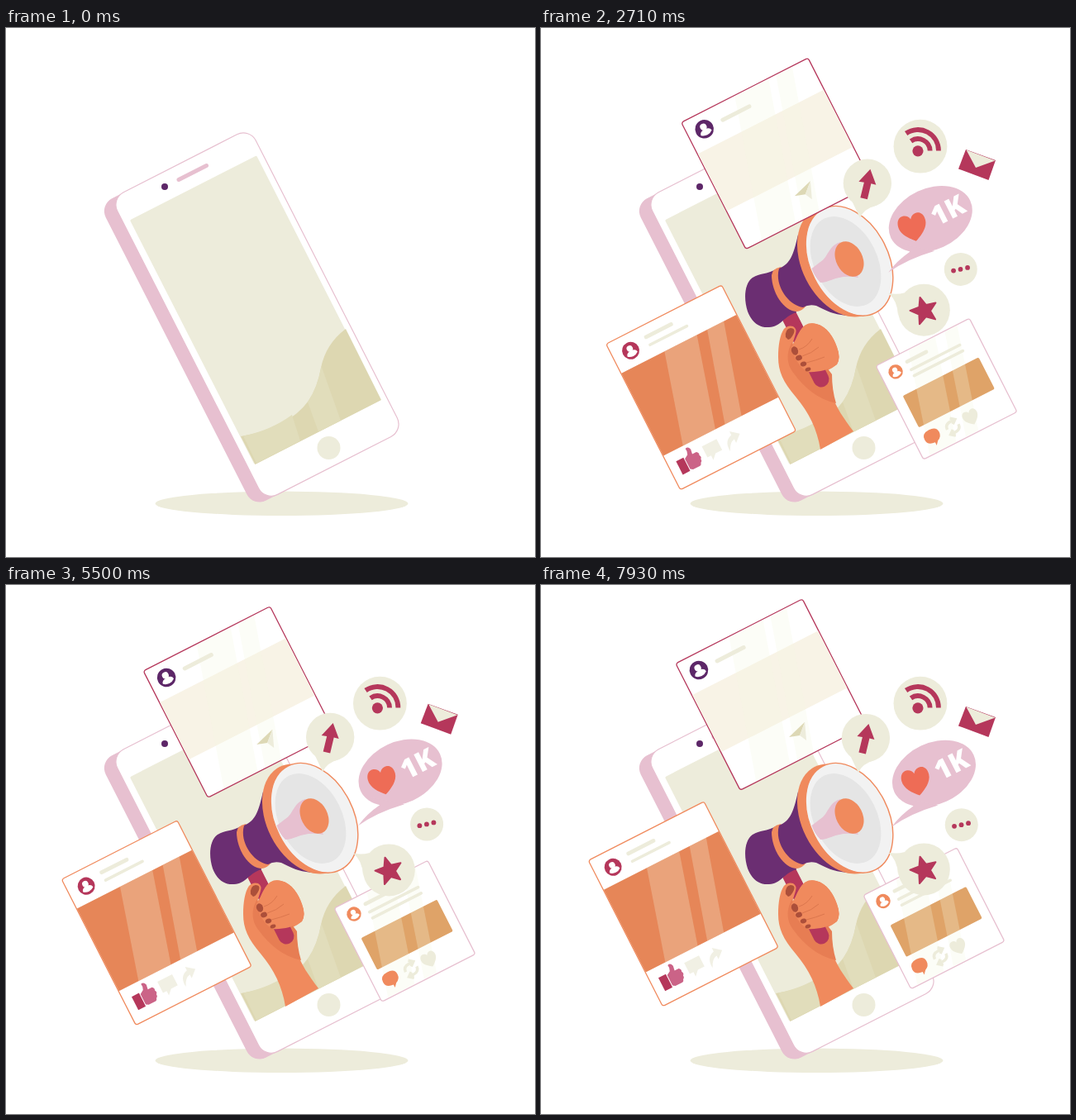
Write an HTML page that moves like this. It is 640 px wide and 640 px high and loops after 8000 ms.

```html
<!DOCTYPE html>
<html lang="en">
<head>
<meta charset="utf-8">
<title>Social media campaign</title>
<style>
  html, body { margin: 0; width: 100%; height: 100%; overflow: hidden; background: #fff; }
  svg { display: block; width: 100vw; height: 100vh; }
  .cream { fill: #edecdb; } .crimson { fill: #b5375b; } .pink { fill: #e7c0d0; }
  .orange { fill: #f08a5d; } .purple { fill: #6b2e72; } .dark { fill: #5d2768; }
  .white { fill: #fff; } .nail { fill: #ac4f3a; }
  .bar { stroke: #edecdb; stroke-linecap: round; }
  .shine { fill: #f1f5de; opacity: .26; }
  .faint { fill: #f1f0e4; }
  .crease { fill: none; stroke: #d9744c; stroke-width: .9; }
</style>
</head>
<body>
<svg id="stage" viewBox="0 0 640 640"></svg>
<script>
const LOOP = 8000, STEPS = 112, TILT = -27;
const stage = document.getElementById('stage');

const clamp = x => Math.min(1, Math.max(0, x));
const smooth = x => { x = clamp(x); return x * x * (3 - 2 * x); };
const backOut = x => { const q = 1 - clamp(x); return 1 - 2.70158 * q ** 3 + 1.70158 * q * q; };

const circle = (x, y, r, cls) => `<circle cx="${x}" cy="${y}" r="${r}" class="${cls}"/>`;
const path = (d, cls, extra = '') => `<path d="${d}" class="${cls}" ${extra}/>`;
const tilted = (x, y, a, b, cls, extra = '') =>
  `<ellipse rx="${b}" ry="${a}" transform="translate(${x} ${y}) rotate(${TILT})" class="${cls}" ${extra}/>`;
const bar = (x, y, length, width) =>
  `<path d="M${x} ${y}h${length}" class="bar" stroke-width="${width}"/>`;
const slant = (top, bottom, y, h, w) =>
  path(`M${top} ${y}h${w}L${bottom + w} ${y + h}h${-w}Z`, 'shine');
const heart = (x, y, size, turn, fill) =>
  `<path transform="translate(${x} ${y}) rotate(${turn}) scale(${size})" fill="${fill}"
    d="M0 1C-.45 .7-1 .25-1-.3C-1-.75-.75-.95-.5-.95C-.25-.95-.08-.8 0-.6C.08-.8 .25-.95 .5-.95C.75-.95 1-.75 1-.3C1 .25 .45 .7 0 1Z"/>`;
const avatar = (x, y, r, cls) => `<g transform="translate(${x} ${y}) scale(${r / 10})">
  ${circle(0, 0, 10, cls)}${circle(0, -2.6, 3.6, 'white')}
  ${path('M-6.500 4.5Q-6 .2 0 .2Q6 .2 6.500 4.5Q3.5 7 0 7Q-3.5 7-6.500 4.5Z', 'white')}</g>`;
const sheet = (w, h, stroke) =>
  `<rect width="${w}" height="${h}" rx="3" fill="#fff" stroke="${stroke}" stroke-width="1.3"/>`;

const phone = `
  <ellipse cx="333.5" cy="575.3" rx="153" ry="14.7" class="cream"/>
  <g transform="rotate(${TILT})">
    <rect x="3.5" y="242" width="200" height="410" rx="17" class="pink"/>
    <rect x="19.5" y="241.6" width="188" height="410.4" rx="17" fill="#fff" stroke="#e7c0d0" stroke-width="1.2"/>
    <rect x="28" y="275" width="172" height="332" rx="2" class="cream"/>
  </g>
  ${path('M284 494Q341 485 366 451Q377 435 381 411Q387 382 411 364L454 450L301.5 528Z', '', 'fill="#ddd7b1"')}
  ${path('M287 493.5Q320 487 346 468L356 499.500L303 526.500Z', '', 'fill="#e1ddbb"')}
  ${path('M365 452.500Q377 435 381.500 409L405 475L378 488.500Z', '', 'fill="#e1ddbb"')}
  ${circle(390.5, 508, 14, 'cream')}${circle(192, 192, 4, 'dark')}
  <path d="M209 183.500L242.500 166.500" stroke="#e7c0d0" stroke-width="5" stroke-linecap="round"/>`;

const megaphone = `
  <path d="M300 348L339 425" stroke="#b5375b" stroke-width="19" stroke-linecap="round"/>
  ${path('M286 291C272 299 265 296 256 302C246 309 245 328 250 343C255 356 264 363 276 362C291 361 293 349 309 344Z', 'purple')}
  ${path('M290 289Q280 291 279 299C279 319 293 343 310 343Q316 342 320 337Z', 'orange')}
  ${path('M288 291C303 285 306 271 311 250L376 348C354 348 344 341 333 336Q324 334 317 338C300 336 282 312 288 291Z', 'purple')}
  ${tilted(363, 283, 70.6, 47.4, 'orange')}
  ${tilted(373, 281.8, 70.3, 47.2, '', 'fill="#f2f2f2" stroke="#f08a5d" stroke-width="1.4"')}
  ${tilted(368.5, 282.5, 58, 38, '', 'fill="#e5e5e5"')}
  ${path('M362 259C347 264 348 277 338 283L327.500 291Q331 301 338 308C350 308 359 297 384 302Z', 'pink')}
  ${tilted(373, 279.5, 22.5, 16, 'orange')}
  ${path('M338 510C334 485 324 465 308 446C293 428 287 416 287 398C287 384 289 371 294 364Q299 359 305 361Q310 364 308 370L304 383C308 379 309 374 312 369C318 358 325 356 333 358C346 361 354 374 358 386Q363 399 358 407Q352 412 347 414C352 418 349 433 353 446C357 459 366 472 378 488Z', 'orange')}
  ${path('M304 380C297 391 296 406 306 418C318 435 335 449 357 454Q352 438 352 419L346 411Q314 421 304 380Z', '', 'fill="#e77d53"')}
  <path d="M328 403L339 425" stroke="#b5375b" stroke-width="19" stroke-linecap="round"/>
  ${path('M303 386C308 379 309 374 312 369C318 358 325 356 333 358C346 361 354 374 358 386Q363 399 358 407C348 414 333 417 322 416Q308 407 303 386Z', 'orange')}
  ${path('M296 374Q295 364 302 363Q308 363 306 369Q303 376 299 377Z', 'nail')}
  ${[[307, 390.5, 5.4, 4], [312, 399, 3.2, 4], [317.5, 406.5, 2.8, 3.8], [323, 413, 2.3, 3.5]].map(([x, y, a, b]) =>
    `<ellipse rx="${b}" ry="${a}" transform="translate(${x} ${y}) rotate(-20)" class="nail"/>`).join('')}
  ${path('M312 389Q322 386 328 376M316 397Q327 394 336 386M321 405Q333 402 343 398', 'crease')}`;

const cardTop = `${sheet(172, 172, '#b5375b')}
  <rect x=".7" y="43" width="170.600" height="77.500" fill="#f8f3e6"/>
  ${slant(72, 22, 1, 170, 46)}${slant(128, 78, 1, 170, 22)}
  ${avatar(21.3, 19.8, 11.3, 'dark')}${bar(46, 20, 36, 5)}
  ${path('M107 134L81.700 141.500L94.200 145.600Z', '', 'fill="#ddd8b5"')}
  ${path('M107 134L94.200 145.600L98.600 154.600Z', 'cream')}`;

const cardLeft = `${sheet(157, 198, '#f08a5d')}
  <rect x=".5" y="40" width="156" height="112" fill="#e68658"/>
  ${slant(59, 27, 40, 112, 44)}${slant(117, 84, 40, 112, 22.5)}
  ${avatar(23, 20.7, 10.5, 'crimson')}${bar(47, 14.5, 34, 4.8)}${bar(47, 25, 50, 3.6)}
  ${path('M11 165h10v18h-10Z', 'crimson')}
  ${path('M22 167L27 164Q29 160 28 156.500Q32 155 33.500 160L32.500 166H38Q41 168 39.500 171Q41.500 174 39 176Q39.500 179 37 180Q36.500 183 34 183H25L22 181Z', '', 'fill="#cb6387"')}
  ${path('M47 163h20v15h-9l-6 6v-6h-5Z', 'faint')}
  ${path('M75 184C74 175 77 169 85 167V162L95 170L86 178V173Q79 174 75 184Z', 'faint')}`;

const cardRight = `${sheet(127, 127, '#e7c0d0')}
  <rect x="12.500" y="47" width="103" height="43" rx="2" fill="#dfa368"/>
  ${slant(44, 9, 1, 125, 36)}${slant(93, 58, 1, 125, 17)}
  ${avatar(18.2, 17.1, 8.7, 'orange')}
  ${bar(36, 12.5, 26, 4.6)}${bar(36, 23.5, 66, 3.6)}${bar(36, 31.5, 66, 3.6)}
  ${path('M22 98Q32 98 32 106Q32 112 26 114.500L22 119V115Q12 114.500 12 106.500Q12 98 22 98Z', 'orange')}
  <path d="M42 108Q42 101 50 101H55M51 97L56 101L51 105M57 108Q57 115 49 115H44M48 111L43 115L48 119" fill="none" stroke="#edecdb" stroke-width="3.500"/>
  ${heart(74.3, 107.5, 9.5, 0, '#edecdb')}`;

const starPoints = Array.from({ length: 10 }, (_, i) => {
  const a = (i * 36 - 107) * Math.PI / 180, r = i % 2 ? 7.5 : 17;
  return `${463.5 + r * Math.cos(a)},${342 + r * Math.sin(a)}`;
}).join(' ');

const likes = `
  <ellipse rx="53" ry="37" transform="translate(471 231.500) rotate(-25)" class="pink"/>
  ${path('M436 262L446 271Q430 282 420 296Q442 280 476 270Z', 'pink')}
  ${heart(449.5, 241.5, 17, -14, '#ee6c56')}
  <text transform="translate(492 221) rotate(${TILT})" y="11.500" text-anchor="middle" class="white"
    font-family="'Open Sans', sans-serif" font-weight="800" font-size="33">1K</text>`;
const arrow = `${circle(395, 188, 29.2, 'cream')}${path('M376 209L386 230Q391 219 405 215Z', 'cream')}
  ${path('M398.500 171L405.500 190L399.500 188.500L395 207.500L386.500 205.500L391 187L384.500 186Z', 'crimson')}`;
const star = `${circle(463.3, 341, 31.5, 'cream')}${path('M440 320Q430 323 420 320.500Q431 329 432 347Z', 'cream')}
  <polygon points="${starPoints}" class="crimson" stroke="#b5375b" stroke-width="2" stroke-linejoin="round"/>`;
const envelope = `${path('M514 147L550 160L541.500 184L505 170.500Z', 'crimson')}
  ${path('M514.500 147.500L549.500 160.500L526 169Z', 'cream')}`;
const wifi = `${circle(459, 143.2, 32.4, 'cream')}${circle(456, 148.8, 6.6, 'crimson')}
  <path d="M447.600 136.800A14.700 14.700 0 0 1 470.700 148.500M441.700 127.500A25 25 0 0 1 481 148.500" fill="none" stroke="#b5375b" stroke-width="5.800"/>`;
const dots = circle(507.7, 292, 20, 'cream') +
  circle(499, 293.7, 2.9, 'crimson') + circle(507.5, 292, 2.9, 'crimson') + circle(516, 290, 2.9, 'crimson');

function group(content) {
  const g = document.createElementNS('http://www.w3.org/2000/svg', 'g');
  g.innerHTML = content;
  stage.append(g);
  return g;
}

group(phone);
const hand = group(megaphone);

// end: corner when the loop closes; drift: px per second; rise: distance of the entrance
const cards = [
  { art: cardRight, end: [390, 375.5], drift: [-2.9, -6.4], rise: [26, 60], start: 265, span: 1050 },
  { art: cardLeft, end: [57.3, 333.3], drift: [-4.1, -9.4], rise: [27, 65], start: 565, span: 1000 },
  { art: cardTop, end: [163, 95], drift: [-1.3, -3.7], rise: [43, 114], start: 690, span: 880 },
].map(c => ({ ...c, node: group(c.art) }));

const bubbles = [
  { art: envelope, start: 1285, sway: [2, 2], slow: true },
  { art: likes, start: 690, sway: [4.3, -3.3] },
  { art: arrow, start: 1230, sway: [-2, -2.8] },
  { art: star, start: 1245, sway: [0, 2.8] },
  { art: wifi, start: 1485, sway: [4, 0], slow: true },
  { art: dots, start: 1555, sway: [1, -1.8] },
].map(b => ({ ...b, node: group(b.art) }));

const zoom = (node, x, y, s, dx = 0, dy = 0) =>
  node.setAttribute('transform', `translate(${x + dx} ${y + dy}) scale(${s}) translate(${-x} ${-y})`);

function draw(t) {
  zoom(hand, 358, 499, backOut(t / 1970));

  for (const c of cards) {
    const shown = smooth((t - c.start) / c.span);
    const [x, y] = c.end.map((e, i) => e + c.drift[i] * (t - 7930) / 1000 + c.rise[i] * (1 - shown));
    c.node.setAttribute('transform', `translate(${x} ${y}) rotate(${TILT})`);
    c.node.setAttribute('opacity', shown);
  }

  const settled = clamp((t - 1570) / 1100);
  const quickSway = (1 - Math.cos(2 * Math.PI * (t - 580) / 2000)) / 1.4;
  const slowSway = Math.cos(2 * Math.PI * (t / 7200 - .24)) - .66;
  for (const b of bubbles) {
    const w = settled * (b.slow ? slowSway : quickSway);
    zoom(b.node, 377, 290, backOut((t - b.start) / 1000), b.sway[0] * w, b.sway[1] * w);
  }
}

const origin = performance.now();
function tick() {
  const time = (performance.now() - origin) % LOOP;
  draw(Math.floor((time + 5) * STEPS / LOOP) % STEPS * LOOP / STEPS);
  requestAnimationFrame(tick);
}
tick();
</script>
</body>
</html>
```
